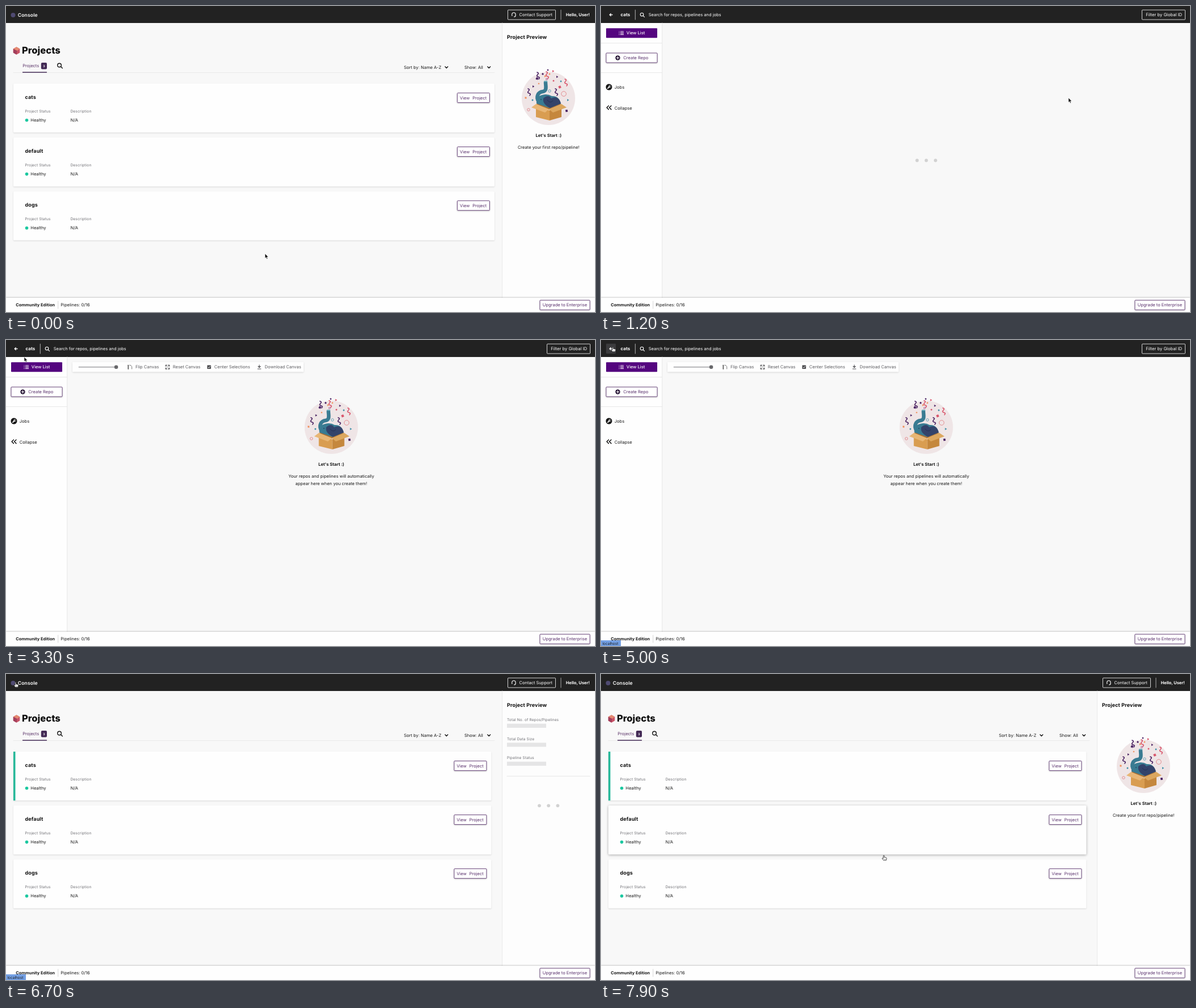
An HTML page that plays this animation: 1037x540 px, repeating every 8 s.

```html
<!DOCTYPE html>
<html lang="en">
<head>
<meta charset="utf-8">
<title>Console</title>
<style>
  html, body { margin: 0; width: 100%; height: 100%; overflow: hidden; background: #f8f8f8; }
  svg { display: block; width: 100vw; height: 100vh; }
  text { font-family: Inter, "Open Sans", sans-serif; font-size: 7.53px; fill: #1a1a1a;
         white-space: pre; text-rendering: geometricPrecision; }
  .bold { font-weight: 700; font-size: 7.4px; }
  .title { font-weight: 700; font-size: 9px; letter-spacing: .12px; fill: #111; }
  .label { font-size: 6.55px; letter-spacing: .14px; fill: #6f6f74; }
  .white { fill: #fff; }
  .tool { fill: #5b5b5f; }
  .mid { text-anchor: middle; }
  .btn rect { fill: #fff; stroke: #582f6b; stroke-width: .9; filter: drop-shadow(0 1px 1.2px #0003); }
  .btn text { fill: #582f6b; }
  .btn.hover rect { filter: drop-shadow(0 1px 2px #6a2a9d99); }
  .btn.hover text { fill: #8b2fb8; }
  .card > rect:first-child { fill: #fefefe; filter: drop-shadow(0 1px 1px #0002); }
  .card.hover > rect:first-child { filter: drop-shadow(0 1.5px 2px #0005); }
  .line { fill: none; stroke-linecap: round; stroke-linejoin: round; }
</style>
</head>
<body>
<svg id="stage" viewBox="0 0 1037 540" preserveAspectRatio="none"></svg>
<script>
const LOOP = 8000, STEP = 100;
const stage = document.getElementById('stage');

const text = (x, y, str, cls = '', extra = '') => `<text x="${x}" y="${y + 2.7}" class="${cls}" ${extra}>${str}</text>`;
const rect = (x, y, w, h, fill, extra = '') => `<rect x="${x}" y="${y}" width="${w}" height="${h}" fill="${fill}" ${extra}/>`;
const dot = (x, y, r, fill, extra = '') => `<circle cx="${x}" cy="${y}" r="${r}" fill="${fill}" ${extra}/>`;
const poly = (points, fill) => `<polygon points="${points}" fill="${fill}"/>`;
const line = (d, color, width = 1) => `<path class="line" d="${d}" stroke="${color}" stroke-width="${width}"/>`;
const group = (id, body, extra = '') => `<g id="${id}" ${extra}>${body}</g>`;
const at = (x, y, body) => `<g transform="translate(${x} ${y})">${body}</g>`;

const searchIcon = (x, y, r, color, width) =>
  dot(x - 1, y - 1, r, 'none', `stroke="${color}" stroke-width="${width}"`) +
  line(`M${x + r * .7 - .8} ${y + r * .7 - .8}l${r * .85} ${r * .85}`, color, width);
const chevron = (x, y) => line(`M${x - 2.4} ${y - 1.2}l2.4 2.5 2.4-2.5`, '#111', 1.4);
const loader = (x, y) => [-16.2, 0, 16.2].map(dx => dot(x + dx, y, 2.9, '#d2d2d2')).join('');
const button = (id, x, y, w, label, labelX, extra = '') =>
  group(id, rect(x, y, w, 17, '', 'rx="1"') + text(labelX, y + 8.5, label, '', extra), 'class="btn"');

function illustration() {
  const ribbons = [
    [-36, -17, '#4a2363'], [12, -17, '#4a2363'], [29, -34, '#d9566c'], [-20, -46, '#4a2363'], [-4, -47, '#d9566c'], [16, 4, '#a04a86']
  ].map(([x, y, c]) => line(`M${x} ${y}q4 1 1 4t1 4 1 4`, c, 1.7)).join('');
  const diamonds = [
    [-20, -35, '#4a2363', 2.6], [20, -20, '#d9566c', 2.8], [32, 22, '#4a2363', 2.5], [-40, -1, '#f0915f', 2],
    [9, -31, '#d9566c', 1.7], [-10, -43, '#4a2363', 1.9], [-1, -50, '#4a2363', 1.6], [-17, -26, '#f0915f', 1.5], [2, -43, '#f0915f', 1.6]
  ].map(([x, y, c, s]) => rect(-s, -s, 2 * s, 2 * s, c, `transform="translate(${x} ${y}) rotate(${45 + x}) scale(.75)"`)).join('');
  const flags = [[-28, -21, '#4a2363'], [14, -38, '#4a2363'], [33, 3, '#3c8ea6'], [-7, -39, '#f0915f'], [7, -48, '#d9566c']]
    .map(([x, y, c]) => poly(`${x},${y - 2} ${x + 3.4},${y} ${x},${y + 2}`, c)).join('');
  const rings = [[27, -8, 4.3, '#e0777c'], [-35, 20, 2.3, '#e0777c'], [2, -13, 2.2, '#4b96ae'], [-3, -34, 1.5, '#a04a86']]
    .map(([x, y, r, c]) => dot(x, y, r, 'none', `stroke="${c}" stroke-width=".8"`)).join('');
  return dot(0, 0, 47, '#efe5e6') + ribbons + diamonds + flags + rings +
    dot(-28, 3, 1.5, '#3c8ea6') + dot(22, -30, 1.4, '#3c8ea6') +
    poly('-22,10 0,3 23,10 1,20', '#a96f32') +
    line('M-17 6C-23-3-18-11-10-12S-5-22-5-28', '#397b92', 6.5) +
    line('M-7-30l4.4 0', '#6fb0bf', 2) +
    `<path d="M-21 9Q-22-4-11-6Q-2-9 6-4Q18-5 22 9L2 17Z" fill="#397b92"/>` +
    `<path d="M-9 0Q0-8 5 0Q18-6 22 9L3 17Q-11 10-9 0Z" fill="#33436a"/>` +
    line('M-2 3q5 7 10 1', '#232f52', .9) + dot(-13, 2, .8, '#1d2746') +
    poly('-22,16 2,21 2,39 -22,33', '#d99d51') +
    poly('2,21 23,16 23,33 2,39', '#c5873d') +
    poly('-22,10 1,19 -6,25 -30,16', '#e8b675') +
    poly('23,10 1,19 8,25 32,16', '#dca75f');
}

const PITCH = 95.1;
const card = (name, i) => at(0, 137 + i * PITCH, `<g class="card" id="card${i}">` +
  rect(13, 0, 847, 86.3, '', 'rx="1.5" class="base"') +
  text(33.5, 24.3, name, 'title') +
  text(33.5, 48, 'Project Status', 'label') + text(113.5, 48, 'Description', 'label') +
  dot(36.5, 64.5, 2.8, '#1cc8a0') + text(43.3, 64.5, 'Healthy') + text(113.5, 64.5, 'N/A') +
  `<g class="shift">${button('view' + i, 794.5, 16.5, 57, 'View Project', 799, 'word-spacing="2.7"')}</g></g>`);

const field = (label, y) => text(882, y, label, 'label') + rect(882, y + 7.5, 69, 7.2, '#e5e5e6');

const projectsPage = group('projects',
  dot(12.5, 16, 4, '#4f4a72') + text(20.8, 16.5, 'Console', 'title white', 'style="font-size:8.6px;font-weight:600"') +
  rect(883.5, 7, 84, 17, 'none', 'stroke="#fff" stroke-width=".8" rx="1"') +
  line('M890.8 17v-2a3.2 3.2 0 0 1 6.4 0v2q0 2-2.6 2M890.9 15.2v2M897.1 15.2v2', '#fff', 1.1) +
  text(903.5, 15.5, 'Contact Support', 'white') +
  line('M977 7v17', '#ccc', .8) + text(985.8, 15.5, 'Hello, User!', 'bold white') +
  rect(874, 30, 163, 485, '#fdfdfd') + line('M873.7 30v485', '#e9e9e9') +
  poly('18.5,72.3 24.3,75.6 24.3,82.4 18.5,85.7 12.8,82.4 12.8,75.6', '#c95366') +
  poly('18.5,72.3 24.3,75.6 19.5,79 12.8,75.6', '#e58a70') +
  poly('12.8,75.6 19.5,79 18.5,85.7 12.8,82.4', '#a23f5c') +
  text(28, 80.9, 'Projects', '', 'style="font-size:16.6px;font-weight:800;fill:#111"') +
  line('M13 117.6H860', '#e6e6e6', .8) +
  text(29.3, 105.7, 'Projects', '', 'style="fill:#5a3268"') +
  rect(61.8, 100, 10.2, 11.4, '#432a55', 'rx="2"') + text(66.9, 105, '3', 'white mid', 'style="font-size:5.2px;font-weight:700"') +
  line('M29.5 117H71.5', '#432a55', 1.3) +
  searchIcon(95, 105.5, 3.3, '#111', 1.4) +
  text(700.5, 108, 'Sort by: Name A-Z') + chevron(775.5, 108.2) +
  text(807, 108, 'Show: All') + chevron(850.3, 108.2) +
  ['cats', 'default', 'dogs'].map(card).join('') +
  rect(13, 137, 3.5, 86.3, '#25b899', 'id="active"') +
  text(882, 54.8, 'Project Preview', 'title') +
  group('preview', at(955, 163, illustration()) +
    text(955.3, 228, "Let's Start :)", 'bold mid', 'style="font-size:7.6px"') +
    text(955.2, 249.3, 'Create your first repo/pipeline!', 'mid')) +
  group('skeleton', field('Total No. of Repos/Pipelines', 80.2) + field('Total Data Size', 113.8) +
    field('Pipeline Status', 147.2) + line('M882 180.3H1028', '#e6e6e6') + loader(955.2, 232.3)));

const toolbar =
  rect(117, 39, 407, 17.2, '#fefefe', 'rx="1" style="filter:drop-shadow(0 1px 1.5px #0002)"') +
  line('M128.5 47.7H194', '#b4b4b6', 1.9) + dot(194, 47.7, 3.3, '#68686b') +
  line('M215.2 44.3v7', '#333', 1.3) + line('M217.6 44.3q4 .5 4 3.5v3.2', '#777', 1) + text(228, 47.7, 'Flip Canvas', 'tool') +
  line('M281 46.5v-2.3h2.3M285.5 44.2h2.3v2.3M287.8 49v2.3h-2.3M283.3 51.3h-2.3v-2.3M281.4 44.6l2 2M287.4 44.6l-2 2M281.4 50.9l2-2M287.4 50.9l-2-2', '#4b4b4e', 1) +
  text(293.8, 47.7, 'Reset Canvas', 'tool') +
  rect(354.2, 44.4, 6.7, 6.7, '#4b4b4e', 'rx="1"') + line('M355.8 47.9l1.3 1.4 2.4-2.8', '#fff', .9) +
  text(366.8, 47.7, 'Center Selections', 'tool') +
  line('M446 44v4.2M444 46.5l2 2 2-2M443.2 51h5.6', '#4b4b4e', 1.1) + text(455.6, 47.7, 'Download Canvas', 'tool');

const repoPage = group('repo',
  rect(9, 6.5, 17, 17.5, '#3b3b3d', 'id="backHover" rx="1"') +
  line('M20 15.5h-4.6M17.3 13.4l-2.1 2.1 2.1 2.1', '#fff', 1.3) +
  text(34.5, 15.5, 'cats', 'bold white', 'style="font-size:8px"') + line('M60.3 7v17', '#ddd', .8) +
  searchIcon(73, 16, 2.8, '#fff', 1.1) + text(83.8, 15.5, 'Search for repos, pipelines and jobs', 'white') +
  rect(952.5, 7, 76, 17, 'none', 'stroke="#fff" stroke-width=".8" rx="1"') + text(959.2, 15.5, 'Filter by Global ID', 'white', 'style="font-size:7.65px"') +
  rect(0, 30, 107.5, 485, '#fefefe') + line('M107.7 30v485M0 65.5H107.5M0 117.6H107.5', '#e6e6e6', .9) +
  rect(9, 39.2, 90, 17, '#54057f', 'id="viewList" rx="1"') +
  line('M34.5 45h5M34.5 47.7h5M34.5 50.4h5M32 45h.1M32 47.7h.1M32 50.4h.1', '#fff', 1.2) + text(44.8, 47.7, 'View List', 'white', 'font-weight="500"') +
  button('createRepo', 9, 83, 90, 'Create Repo', 39.3) +
  dot(29.5, 91.5, 4.2, '#2c1a3a') + line('M27.3 91.5h4.4M29.5 89.3v4.4', '#fff', 1.1) +
  dot(14, 143, 5.5, '#151515') + line('M11.8 145.4l3-3', '#fff', 1.6) + line('M16.8 140.7a1.7 1.7 0 1 0 .3 1.8', '#fff', 1) +
  text(23.8, 143.4, 'Jobs') +
  line('M13.5 176l-3.4 3.3 3.4 3.3M18 176l-3.4 3.3 3.4 3.3', '#151515', 1.5) + text(23.8, 179.8, 'Collapse') +
  group('loading', loader(572.7, 272.5)) +
  group('canvas', toolbar + at(572.7, 154, illustration()) +
    text(572.7, 219.3, "Let's Start :)", 'bold mid', 'style="font-size:7.6px"') +
    text(572.7, 240.7, 'Your repos and pipelines will automatically', 'mid') +
    text(572.7, 253.2, 'appear here when you create them!', 'mid')));

const footer =
  rect(0, 515, 1037, 25, '#fefefe', 'style="filter:drop-shadow(0 -1px 1px #0003)"') +
  text(17.3, 527.6, 'Community Edition', 'bold') + line('M91.7 521v13', '#ccc', .8) +
  text(96.3, 527.6, 'Pipelines: 0/16') +
  button('upgrade', 940, 519.2, 88, 'Upgrade to Enterprise', 944.8) +
  group('status', rect(0, 530, 35, 10, '#739fe3') + text(2.5, 535.2, 'localhost', '', 'style="font-size:6.5px"'));

const pointer =
  group('arrow', '<path d="M0 0V8.2L1.9 6.5 3.2 9.4 4.6 8.8 3.4 6H5.9Z" fill="#111" stroke="#fff" stroke-width=".6"/>') +
  group('hand', '<path d="M-.9.6Q0-.5.8.6V3.4L4 4Q5 4.3 4.9 5.4L4.2 8.7H-.7L-3 5.6Q-2.9 4.4-1.8 4.9L-.9 5.6Z" fill="#fff" stroke="#222" stroke-width=".8" stroke-linejoin="round"/><path d="M1 6v1.6M2.7 6v1.6" stroke="#444" stroke-width=".5"/>');

stage.innerHTML = rect(0, 0, 1037, 540, '#f8f8f8') + rect(0, 0, 1037, 30, '#222') +
  projectsPage + repoPage + footer + group('cursor', pointer);

// time, x, y of the pointer tip
const path = [
  [0, 456, 437], [100, 456, 437], [800, 823, 162], [2200, 823, 162], [2700, 596, 240], [3300, 32, 30],
  [3600, 32, 30], [4000, 21, 12], [5200, 21, 12], [5700, 60, 93], [6100, 60, 93], [6500, 17, 14.5],
  [7100, 17, 14.5], [7800, 498, 320], [8000, 498, 320]
];

function pointerAt(t) {
  const i = path.findIndex((p, n) => n && t <= p[0]);
  const [t0, x0, y0] = path[i - 1], [t1, x1, y1] = path[i];
  const u = (t - t0) / (t1 - t0), e = u * u * (3 - 2 * u);
  return [x0 + (x1 - x0) * e, y0 + (y1 - y0) * e];
}

const $ = id => document.getElementById(id);
const show = (id, on) => { $(id).style.display = on ? '' : 'none'; };
const within = (t, a, b) => t >= a && t < b;

function render(t) {
  const [x, y] = pointerAt(t);
  const over = (l, top, w, h) => within(x, l, l + w) && within(y, top, top + h);
  const inRepo = within(t, 1000, 6600), returned = t >= 6600;
  const loading = within(t, 1000, 1700), fetching = within(t, 6600, 7100);

  show('projects', !inRepo);
  show('repo', inRepo);
  show('loading', loading);
  show('canvas', !loading);
  show('skeleton', fetching);
  show('preview', !fetching);
  show('active', returned);
  show('status', within(t, 4000, 5300) || within(t, 6500, 7200));

  let hot = false;
  const shift = returned ? 5.5 : 0;
  for (let i = 0; i < 3; i++) {
    const top = 137 + i * PITCH;
    const onCard = !inRepo && over(13, top, 847 - shift, 88);
    $('card' + i).classList.toggle('hover', onCard);
    $('view' + i).classList.toggle('hover', onCard && over(794.5 - shift, top + 16, 57, 17));
    $('card' + i).querySelector('.base').setAttribute('width', 847 - shift);
    $('card' + i).querySelector('.shift').setAttribute('transform', `translate(${-shift} 0)`);
    hot ||= onCard;
  }
  const onBack = inRepo && over(9, 6, 17, 18);
  const onList = inRepo && over(9, 39, 90, 17);
  const onCreate = inRepo && over(9, 83, 90, 17);
  const onLogo = !inRepo && over(8, 8, 50, 16);
  show('backHover', onBack);
  $('createRepo').classList.toggle('hover', onCreate);
  hot ||= onBack || onList || onCreate || onLogo;

  show('hand', hot);
  show('arrow', !hot);
  $('cursor').setAttribute('transform', `translate(${x.toFixed(2)} ${y.toFixed(2)})`);
}

const start = performance.now();
function tick() {
  const t = (performance.now() - start) % LOOP;
  render(Math.floor(t / STEP) * STEP);
  requestAnimationFrame(tick);
}
tick();
</script>
</body>
</html>
```
